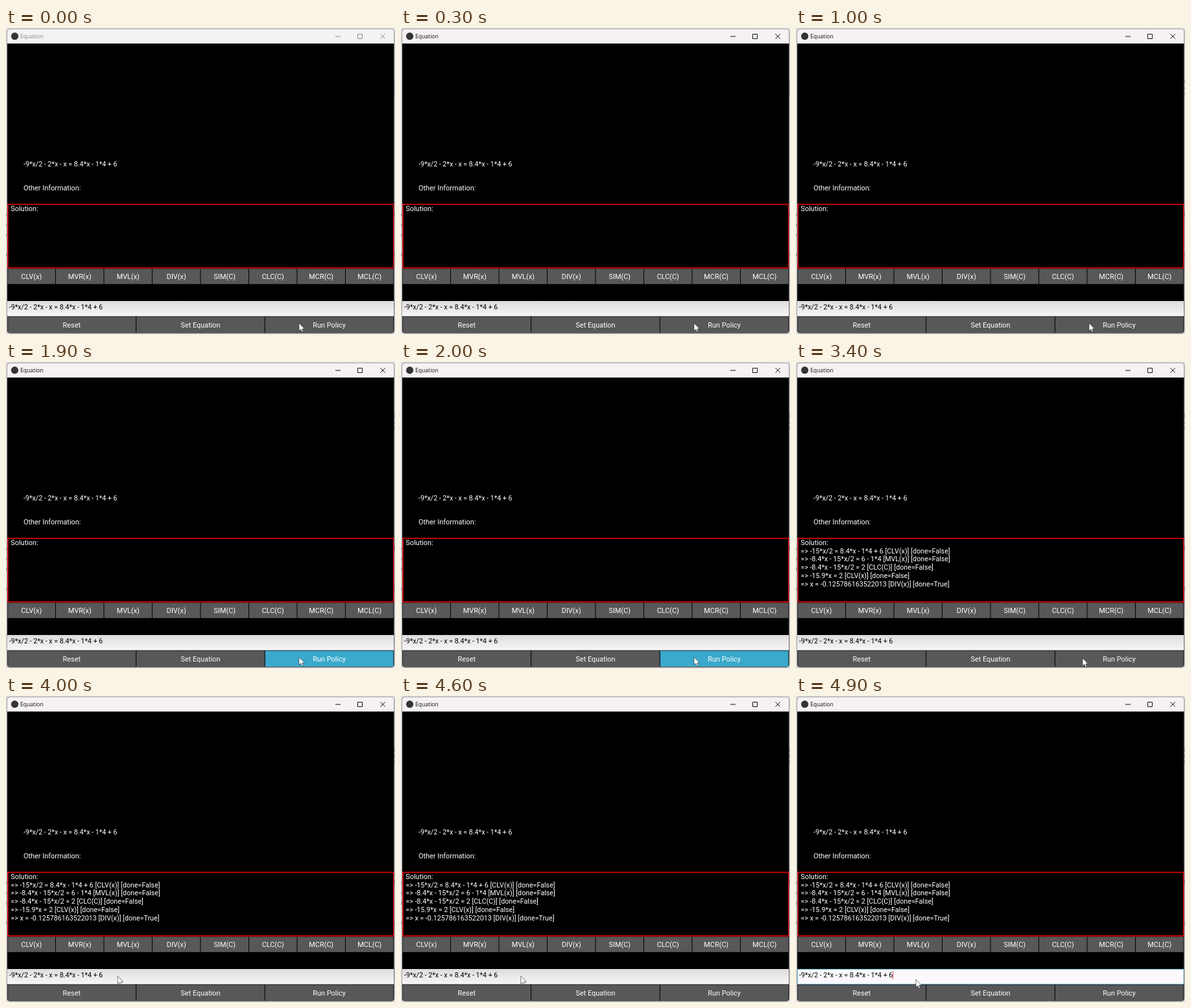
Animation of 600x473 px, one loop 5 s. Source, as an HTML page:

```html
<!DOCTYPE html>
<html lang="en">
<head>
<meta charset="utf-8">
<title>Equation</title>
<style>
  html, body { margin: 0; height: 100%; overflow: hidden; background: #dcdadd; }
  svg { display: block; width: 100vw; height: 100vh; }
  text { font-family: Roboto, sans-serif; font-size: 10.9px; fill: #fff; white-space: pre; }
  .formula { font-size: 10.65px; }
  .lines { font-size: 10.7px; }
  .label { text-anchor: middle; }
  .title { font-family: "Open Sans", sans-serif; font-size: 8.6px; fill: currentColor; }
  .glyphs { fill: none; stroke: currentColor; stroke-width: 1; }
</style>
</head>
<body>
<svg viewBox="0 0 600 473">
  <defs>
    <linearGradient id="field" x2="0" y2="1">
      <stop stop-color="#dddbde"/><stop offset="1" stop-color="#f8f6f9"/>
    </linearGradient>
    <clipPath id="frame"><rect x="2" y="2" width="596.5" height="469.5" rx="4"/></clipPath>
  </defs>
  <rect width="600" height="473" fill="#dcdadd"/>
  <path d="M599.5 80v6M599.5 91v5M599.5 100v4M599.5 284v8M599.5 348v6M.5 287v4M.5 303v4M.5 318v5M.5 348v5" stroke="#8d8a96"/>
  <rect x="1.5" y="1.5" width="597.5" height="470.5" rx="4.5" fill="none" stroke="#aaa8ab"/>
  <g clip-path="url(#frame)">
    <rect width="600" height="473"/>
    <g id="bar">
      <rect id="barFill" width="600" height="24"/>
      <circle cx="13.5" cy="12.7" r="5.6" fill="#343336"/>
      <text class="title" x="22" y="16">Equation</text>
      <path class="glyphs" d="M508 13h8M542.5 9.5h7v7h-7zM577.5 9.2l7.4 7.4m0-7.4l-7.4 7.4"/>
    </g>
    <text class="formula" x="27" y="214.3">-9*x/2 - 2*x - x = 8.4*x - 1*4 + 6</text>
    <text x="27" y="251.3">Other Information:</text>
    <rect x="2.8" y="272.6" width="595" height="98.2" fill="none" stroke="#e00009" stroke-width="1.7"/>
    <text x="7.3" y="282.5">Solution:</text>
    <g id="solution"></g>
    <g id="buttons"></g>
    <rect id="input" x="2" y="422" width="596.5" height="23.6"/>
    <rect id="focusRing" x="2.4" y="422.3" width="595.6" height="23" fill="none" stroke="#4fb0cd" stroke-width=".8"/>
    <text class="formula" x="4.8" y="434.8" style="fill:#000">-9*x/2 - 2*x - x = 8.4*x - 1*4 + 6</text>
    <path id="caret" d="M149.6 425v13" stroke="#e0525a"/>
  </g>
  <path id="cursor" d="M0 0V12L2.8 9.5L4.7 13.6L6.5 12.8L4.8 8.8H8.5Z" fill="#fff" stroke="#222" stroke-width=".6" stroke-linejoin="round"/>
</svg>
<script>
const LOOP = 5000;
const $ = id => document.getElementById(id);

function add(parent, tag, attrs, text = '') {
  const el = document.createElementNS('http://www.w3.org/2000/svg', tag);
  for (const key in attrs) el.setAttribute(key, attrs[key]);
  el.textContent = text;
  return parent.appendChild(el);
}

function addRow(labels, top, height, baseline) {
  const pitch = 596 / labels.length;
  return labels.map((label, i) => {
    const x = 2 + i * pitch;
    const box = add($('buttons'), 'rect', { x: x + .5, y: top, width: pitch - 1, height, fill: '#585759' });
    add($('buttons'), 'text', { x: x + pitch / 2, y: baseline, class: 'label' }, label);
    return box;
  });
}

addRow(['CLV(x)', 'MVR(x)', 'MVL(x)', 'DIV(x)', 'SIM(C)', 'CLC(C)', 'MCR(C)', 'MCL(C)'], 372.2, 23.6, 388.2);
const runButton = addRow(['Reset', 'Set Equation', 'Run Policy'], 446.4, 24.6, 462.7)[2];

[
  '=> -15*x/2 = 8.4*x - 1*4 + 6 [CLV(x)] [done=False]',
  '=> -8.4*x - 15*x/2 = 6 - 1*4 [MVL(x)] [done=False]',
  '=> -8.4*x - 15*x/2 = 2 [CLC(C)] [done=False]',
  '=> -15.9*x = 2 [CLV(x)] [done=False]',
  '=> x = -0.125786163522013 [DIV(x)] [done=True]'
].forEach((line, i) => add($('solution'), 'text', { x: 7.3, y: 295.5 + i * 12.95, class: 'lines' }, line));

// Each step: start time, then its values.
const barSteps = [
  [0, '#8b898c', '#f3f3f3'], [100, '#59575a', '#f4f2f4'],
  [200, '#2b292c', '#f5f1f4'], [300, '#111', '#f5f1f4']
];
const cursorSteps = [
  [0, 452, 456.3], [3400, 442, 457.8], [3500, 405, 456], [3600, 330, 449], [3700, 245, 441],
  [3800, 170, 434], [3900, 135, 431.5], [4000, 172.3, 433], [4100, 178, 431], [4200, 181, 430],
  [4300, 183, 429], [4500, 184.5, 427.5], [4600, 184.8, 433], [4700, 185, 438.3]
];
const stepAt = (steps, t) => steps.findLast(step => step[0] <= t);
const show = (el, on) => el.setAttribute('visibility', on ? 'visible' : 'hidden');

function draw(t) {
  const [, ink, fill] = stepAt(barSteps, t);
  $('bar').style.color = ink;
  $('barFill').setAttribute('fill', fill);

  runButton.setAttribute('fill', t >= 1900 && t < 2300 ? '#3aa9cb' : '#585759');
  show($('solution'), t >= 2300);

  const focused = t >= 4900;
  $('input').setAttribute('fill', focused ? '#fbf9fc' : 'url(#field)');
  show($('focusRing'), focused);
  show($('caret'), focused);

  const [, x, y] = stepAt(cursorSteps, t);
  $('cursor').setAttribute('transform', `translate(${x} ${y})`);
}

const start = performance.now();
function tick() {
  draw((performance.now() - start) % LOOP);
  requestAnimationFrame(tick);
}
tick();
</script>
</body>
</html>
```
